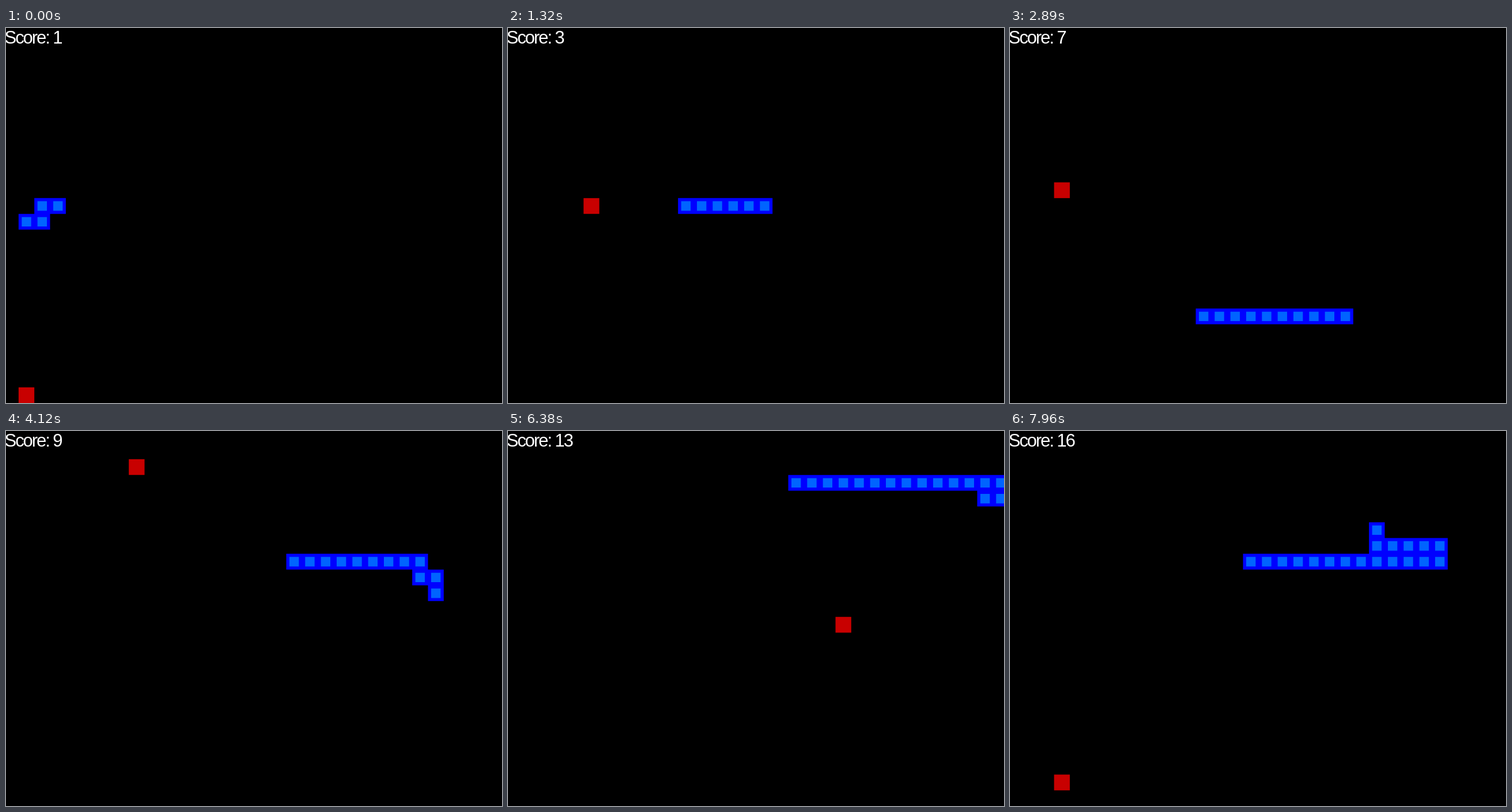
Animation of 861x650 px, one loop 7.99 s. Source, as an HTML page:

```html
<!DOCTYPE html>
<html lang="en">
<head>
<meta charset="utf-8">
<title>Snake</title>
<style>
  html, body { margin: 0; width: 100%; height: 100%; overflow: hidden; background: #000; }
  svg { display: block; width: 861px; height: 650px; }
  text { font: 31px "Liberation Sans", Arial, sans-serif; letter-spacing: -2.05px; fill: #fff; }
  .body { fill: #00f; }
  .core { fill: #0064ff; }
  .food { fill: #c80000; }
</style>
</head>
<body>
<svg viewBox="0 0 861 650">
  <path class="food"/>
  <path class="body"/>
  <path class="core"/>
  <text x="-2.5" y="27"></text>
</svg>
<script>
const LOOP = 7990;
const CELL = 82 / 3;
const START_LENGTH = 3;

// Cells the snake steers for: food, or (with a star) only a bend on the way.
const plan = `2,12 1,12* 1,23 23,12 5,11 1,19 12,9 21,18 20,18* 3,10 27,10 26,8* 25,8*
  8,2 22,10 10,17 31,3 21,12 20,12* 15,0 23,0* 23,7* 27,7 3,22`;
const goals = [...plan.matchAll(/(\d+),(\d+)(\*?)/g)]
  .map(([, x, y, bend]) => ({ cell: [+x, +y], isFood: !bend }));

const foods = goals.filter(goal => goal.isFood).map(goal => goal.cell);
const route = steer([3, 11], goals);

// Keeps its heading while the goal is ahead; sidesteps to turn back when it is behind.
function steer(head, goals) {
  const trail = [{ cell: head, eaten: 0 }];
  let axis = 0, sign = -1, eaten = 0;

  const advance = (along, target, limit = Infinity) => {
    for (let n = 0; n < limit && head[along] !== target[along]; n++) {
      axis = along;
      sign = Math.sign(target[along] - head[along]);
      head = [...head];
      head[along] += sign;
      trail.push({ cell: head, eaten });
    }
  };

  for (const { cell, isFood } of goals) {
    const first = axis, cross = 1 - axis;
    const isBehind = (cell[first] - head[first]) * sign < 0;
    if (isBehind) advance(cross, cell, 1);
    advance(first, cell);
    advance(cross, cell);
    if (isFood) trail[trail.length - 1].eaten = ++eaten;
  }
  return trail;
}

// Steady pace with a slight slow sway.
const stepAt = time => Math.round(time / 23.62 + 1.1 * Math.sin(Math.PI * time / 4500));

function square([x, y], inset = 0) {
  const size = CELL - 2 * inset;
  const left = x * CELL - 5.5 + inset;
  const top = y * CELL - 5.8 + inset;
  return `M${left} ${top}H${left + size}V${top + size}H${left}Z`;
}

const [food, body, core] = document.querySelectorAll('path');
const label = document.querySelector('text');
let shown = -1;

function draw(step) {
  const head = step + START_LENGTH;
  const score = route[head].eaten;
  const length = START_LENGTH + score;
  const snake = route.slice(head + 1 - length, head + 1);
  food.setAttribute('d', square(foods[score]));
  body.setAttribute('d', snake.map(({ cell }) => square(cell)).join(''));
  core.setAttribute('d', snake.map(({ cell }) => square(cell, CELL / 5)).join(''));
  label.textContent = `Score: ${score}`;
}

const start = performance.now();
function tick() {
  const step = stepAt((performance.now() - start) % LOOP);
  if (step !== shown) draw(shown = step);
  requestAnimationFrame(tick);
}
tick();
</script>
</body>
</html>
```
